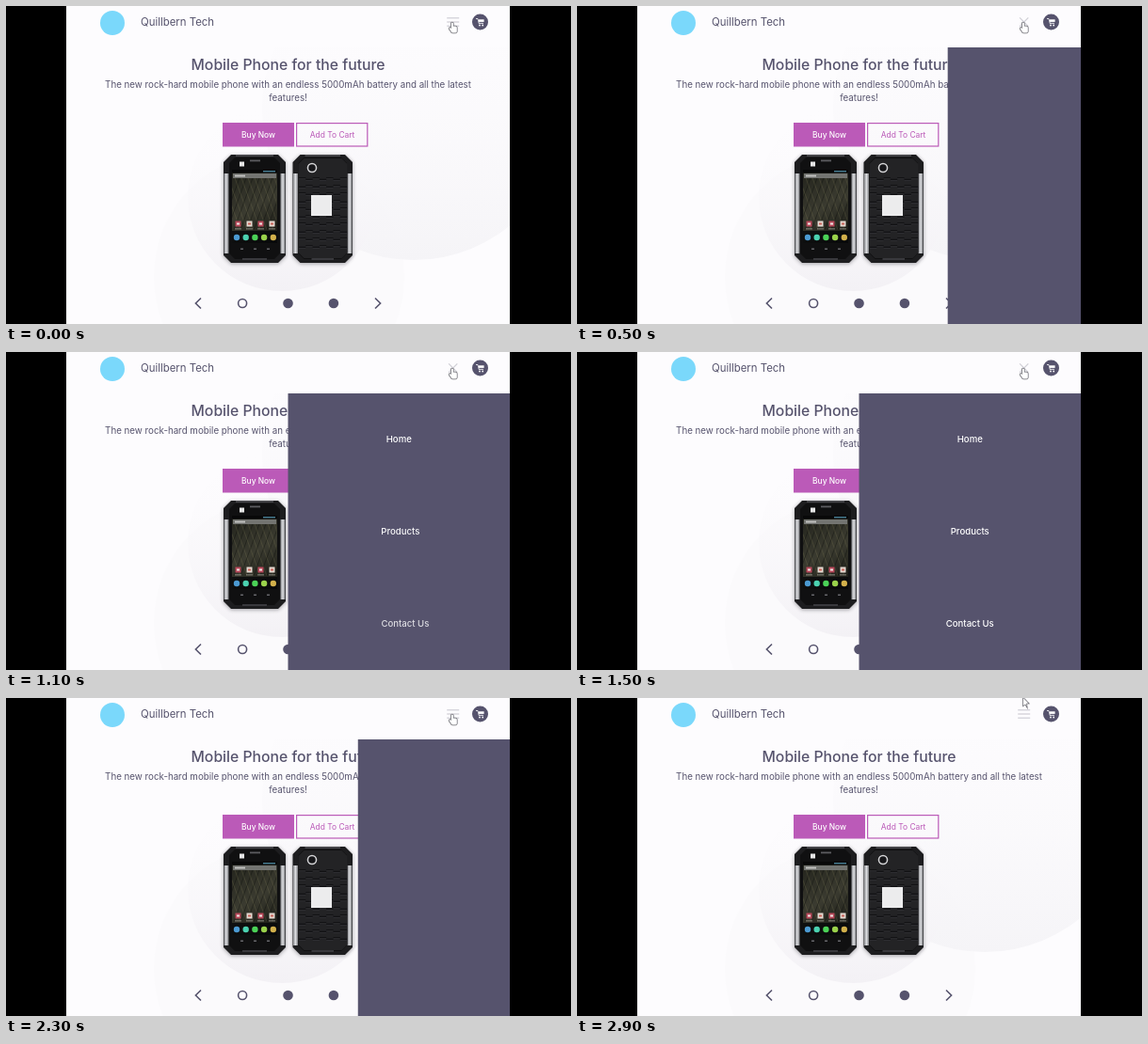
An HTML page with a canvas that plays this animation: 600 by 338 pixels, repeating every 3000 ms.

```html
<!DOCTYPE html>
<html lang="en">
<head>
<meta charset="utf-8">
<title>Shop page with sliding menu</title>
<style>
html, body { margin: 0; width: 100%; height: 100%; overflow: hidden; background: #000; }
canvas { display: block; width: 600px; height: 338px; }
</style>
</head>
<body>
<canvas id="stage" width="600" height="338"></canvas>
<script>
const ctx = document.getElementById('stage').getContext('2d');
const LOOP = 3000, STEP = 100;
const LEFT = 64, RIGHT = 535, WIDTH = RIGHT - LEFT, HEIGHT = 338, HEADER = 44;
const MIDDLE = (LEFT + RIGHT) / 2;
const INK = '#56536d', PINK = '#bb5ab8', PAPER = '#fdfcfe';

const clamp = v => Math.max(0, Math.min(1, v));
const progress = (t, start, length) => clamp((t - start) / length);
const repeat = (n, fn) => { for (let i = 0; i < n; i++) fn(i); };

// Cubic Bezier timing, solved by bisection
function bezier(x1, y1, x2, y2) {
  const curve = (a, b, s) => 3 * a * s * (1 - s) ** 2 + 3 * b * s * s * (1 - s) + s ** 3;
  return x => {
    if (x <= 0 || x >= 1) return clamp(x);
    let lo = 0, hi = 1;
    repeat(24, () => {
      const mid = (lo + hi) / 2;
      if (curve(x1, x2, mid) < x) lo = mid; else hi = mid;
    });
    return curve(y1, y2, lo);
  };
}
const ease = bezier(0.25, 0.1, 0.25, 1);
const easeIn = bezier(0.42, 0, 1, 1);

function rect(x, y, w, h, color) {
  ctx.fillStyle = color;
  ctx.fillRect(x, y, w, h);
}

function disc(x, y, r, color) {
  ctx.fillStyle = color;
  ctx.beginPath();
  ctx.arc(x, y, r, 0, 7);
  ctx.fill();
}

function line(x0, y0, x1, y1, width, color) {
  ctx.strokeStyle = color;
  ctx.lineWidth = width;
  ctx.beginPath();
  ctx.moveTo(x0, y0);
  ctx.lineTo(x1, y1);
  ctx.stroke();
}

// Box with its four corners cut off
function cutBox(x, y, w, h, cut, color) {
  ctx.fillStyle = color;
  ctx.beginPath();
  for (const [sx, sy] of [[-1, -1], [1, -1], [1, 1], [-1, 1]]) {
    const cx = x + w / 2 + sx * w / 2, cy = y + h / 2 + sy * h / 2;
    const side = [cx, cy - sy * cut], end = [cx - sx * cut, cy];
    const [a, b] = sx === sy ? [side, end] : [end, side];
    ctx.lineTo(...a);
    ctx.lineTo(...b);
  }
  ctx.fill();
}

function text(str, x, y, size, color, weight = 400, align = 'center') {
  ctx.font = `${weight} ${size}px Inter, sans-serif`;
  ctx.textAlign = align;
  ctx.fillStyle = color;
  ctx.fillText(str, x, y);
}

function gradient(x0, y0, x1, y1, ...colors) {
  const g = ctx.createLinearGradient(x0, y0, x1, y1);
  colors.forEach((c, i) => g.addColorStop(i / (colors.length - 1), c));
  return g;
}

function fadingDisc(x, y, r, color) {
  disc(x, y, r, gradient(x, y - r, x, y + r, PAPER + '00', color));
}

function drawBackdrop() {
  rect(LEFT, 0, WIDTH, HEIGHT, PAPER);
  disc(290, 288, 133, '#fbfafc');
  fadingDisc(433, 109, 161, '#f5f4f7');
  fadingDisc(293, 203, 100, '#f3f1f5');
  rect(LEFT, 0, WIDTH, HEADER, PAPER);
}

function drawHeader() {
  disc(113, 18, 13, '#7ad8fb');
  text('Quillbern Tech', 143, 21, 11.4, INK, 400, 'left');
  disc(503.5, 17, 8.5, INK);
  line(499, 13.5, 501, 13.5, 0.8, '#fff');
  line(501, 13.5, 502.3, 18.6, 0.8, '#fff');
  line(502, 18.4, 507, 18.4, 0.8, '#fff');
  rect(502, 14.3, 5.6, 2.6, '#fff');
  repeat(2, i => disc(503 + i * 3.2, 20.5, 0.9, '#fff'));
}

function drawPhoneBody(x, w) {
  ctx.save();
  ctx.shadowColor = 'rgba(30,28,36,0.4)';
  ctx.shadowBlur = 4;
  ctx.shadowOffsetY = 1;
  cutBox(x, 158, w, 115, 8, '#1d1d1f');
  ctx.restore();
  for (const railX of [x + 0.5, x + w - 5.5]) {
    rect(railX, 178, 5, 85, gradient(railX, 0, railX + 5, 0, '#8b8c90', '#dcdde0', '#77787c'));
  }
  cutBox(x + 6, 161, w - 12, 108, 6, '#101011');
  rect(x + 13, 158, w - 26, 2, '#454549');
  rect(x + 20, 268, w - 40, 2, '#39393d');
}

function drawWallpaper() {
  rect(240, 174, 48, 78, gradient(240, 174, 288, 252, '#22231c', '#3b3b30', '#131410'));
  repeat(10, i => {
    const x = 228 + i * 7;
    line(x, 180, x + 21, 238, 0.5, 'rgba(150,146,100,0.4)');
    line(x + 21, 180, x, 238, 0.7, 'rgba(8,9,6,0.5)');
  });
}

function drawPhoneFront() {
  drawPhoneBody(231, 66);
  rect(259, 163.5, 11, 1.8, '#5c5c60');
  rect(248, 165.5, 5, 5, '#e5e5e5');
  ctx.save();
  ctx.beginPath();
  ctx.rect(240, 174, 48, 78);
  ctx.clip();
  drawWallpaper();
  ctx.restore();
  rect(240, 174, 48, 3.5, '#080809');
  rect(273, 175, 13, 1.4, '#4a8196');
  rect(241, 178, 46, 5, '#737471');
  rect(243, 179.7, 11, 1.7, '#c9c9c7');
  rect(240, 239, 48, 13, 'rgba(5,6,8,0.75)');

  repeat(4, i => {
    const x = 246.5 + i * 12;
    rect(x - 3, 228.5, 6, 6, i % 2 ? '#e3d8d0' : '#b8485a');
    rect(x - 1.5, 230.5, 3, 2, i % 2 ? '#c8645a' : '#f0e4e2');
    rect(x - 3.5, 236.5, 7, 0.8, '#a5a39a');
  });
  repeat(5, i => disc(245 + i * 9.7, 246, 3.2, `hsl(${205 - i * 40}, 60%, 56%)`));
  repeat(3, i => rect(249 + i * 14, 257.5, 3, 1.5, '#66666b'));
}

function drawPhoneBack() {
  drawPhoneBody(304.5, 63.5);
  cutBox(310.5, 162, 52, 106, 6, '#232325');
  repeat(10, row => repeat(7, col => {
    const x = 311 + col * 7.3, y = 182 + row * 8 + (col + row) % 2 * 1.7;
    rect(x, y, 7.3, 1.5, '#121214');
    rect(x, y + 1.5, 7.3, 0.6, '#38383b');
  }));
  disc(325, 172, 5.3, '#d4d4d6');
  disc(325, 172, 3.8, '#17171a');
  rect(324, 201, 22, 22, '#ececed');
}

function drawChevron(x, side) {
  ctx.strokeStyle = INK;
  ctx.lineWidth = 1.6;
  ctx.beginPath();
  [-1, 0, 1].forEach(k => ctx.lineTo(x + side * (k ? -2.8 : 2.8), 316 + k * 5.5));
  ctx.stroke();
}

function drawContent() {
  text('Mobile Phone for the future', MIDDLE, 68, 15.75, INK, 500);
  text('The new rock-hard mobile phone with an endless 5000mAh battery and all the latest', MIDDLE, 86.8, 9.75, INK);
  text('features!', MIDDLE, 100.5, 9.75, INK);
  rect(230, 124, 76, 25.5, PINK);
  text('Buy Now', 268, 140, 8.4, '#fff', 500);
  ctx.strokeStyle = PINK;
  ctx.lineWidth = 1.2;
  ctx.strokeRect(308.6, 124.6, 75.2, 24.4);
  text('Add To Cart', 346.5, 140, 8.45, PINK);

  drawPhoneFront();
  drawPhoneBack();

  drawChevron(204.2, -1);
  drawChevron(394.8, 1);
  repeat(3, i => disc(MIDDLE + (i - 1) * 48.4, 316, 5.3, INK));
  disc(MIDDLE - 48.4, 316, 3.7, PAPER);
}

function drawMenu(t) {
  const open = easeIn(progress(t, 133, 500)) - easeIn(progress(t, 2050, 500));
  const width = WIDTH / 2 * open;
  if (width <= 0) return;
  rect(RIGHT - width, HEADER, width, HEIGHT - HEADER, INK);
  if (t >= 2100) return;
  ctx.save();
  ['Home', 'Products', 'Contact Us'].forEach((label, i) => {
    const shown = ease(progress(t, 520 + i * 143, 600));
    ctx.globalAlpha = shown;
    text(label, RIGHT - WIDTH / 4 + 32 * (1 - shown), 96.4 + i * 98, 9.6, '#fff', 500);
  });
  ctx.restore();
}

function drawMenuIcon(t) {
  const cross = ease(progress(t, 50, 250)) - ease(progress(t, 2050, 250));
  [-1, 0, 1].forEach(side => {
    ctx.save();
    ctx.translate(474.7, 17 + side * 4.2 * (1 - cross));
    ctx.rotate(-side * cross * Math.PI / 4);
    if (!side) ctx.globalAlpha = 1 - cross;
    rect(-6.5, -0.6, 13, 1.2, '#cfced5');
    ctx.restore();
  });
}

function drawHand() {
  const shape = new Path2D();
  shape.roundRect(472.8, 17.5, 2, 8, 1);
  shape.roundRect(472.8, 21.5, 6, 7, 1.5);
  shape.ellipse(472.3, 25, 1, 2.4, -0.6, 0, 7);
  ctx.stroke(shape);
  ctx.fill(shape);
}

function drawArrow(x, y) {
  ctx.beginPath();
  [[0, 0], [0, 8], [2, 6.4], [3.6, 9], [3.2, 5.8], [5.4, 5.6]].forEach(([dx, dy]) => ctx.lineTo(x + dx, y + dy));
  ctx.closePath();
  ctx.stroke();
  ctx.fill();
}

function drawCursor(t) {
  ctx.fillStyle = '#fff';
  ctx.strokeStyle = '#66666d';
  ctx.lineWidth = 1.5;
  if (t < 2800) drawHand();
  else drawArrow(474, 7 - 7 * progress(t, 2800, 100));
}

function draw(now) {
  // The page is shown at ten steps a second
  const t = Math.floor((now % LOOP) / STEP) * STEP;
  rect(0, 0, 600, HEIGHT, '#000');
  ctx.save();
  ctx.beginPath();
  ctx.rect(LEFT, 0, WIDTH, HEIGHT);
  ctx.clip();
  drawBackdrop();
  drawHeader();
  drawContent();
  drawMenu(t);
  drawMenuIcon(t);
  drawCursor(t);
  ctx.restore();
}

const start = performance.now();
function tick() {
  draw(performance.now() - start);
  requestAnimationFrame(tick);
}
tick();
</script>
</body>
</html>
```
